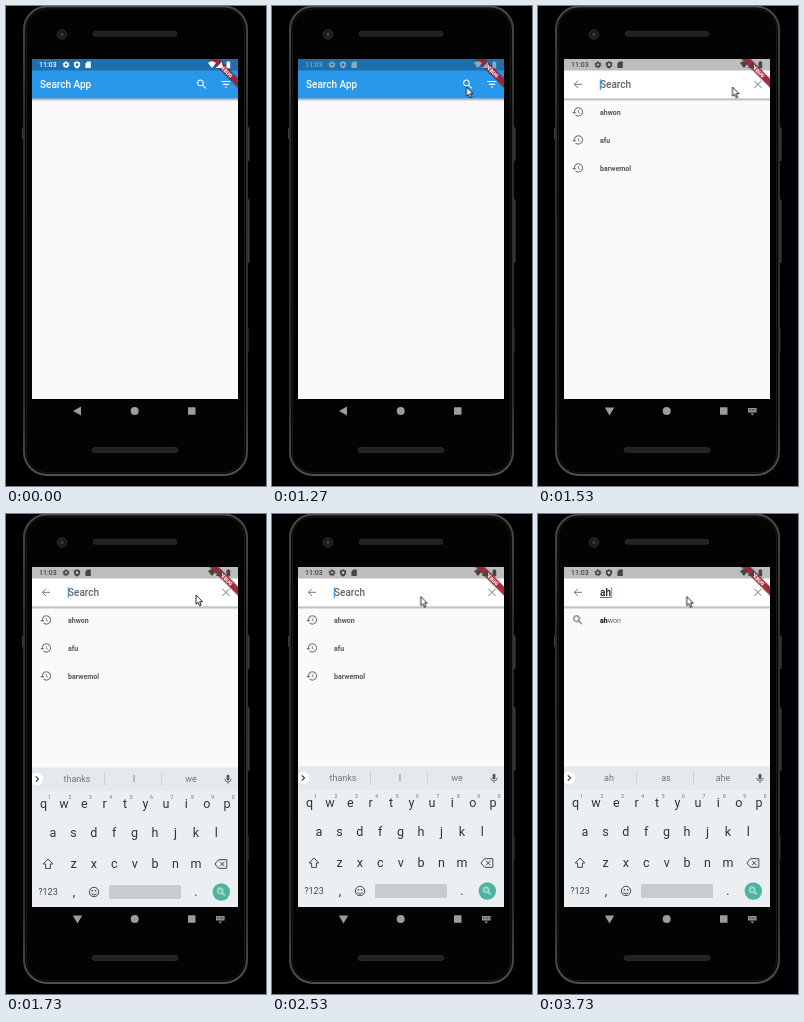
An HTML page that plays this animation: 260x480 px, repeating every 3940 ms.

```html
<!DOCTYPE html>
<html lang="en">
<head>
<meta charset="utf-8">
<title>Search App</title>
<style>
html, body { margin: 0; width: 100%; height: 100%; overflow: hidden; background: #000; }
svg { display: block; width: 260px; height: 480px; font-family: Roboto, sans-serif; }
.title { font-size: 10px; font-weight: 500; }
.row { font-size: 7px; font-weight: 700; fill: #575759; }
.match { font-weight: 400; }
.match tspan { font-weight: 700; fill: #111; }
.mid { text-anchor: middle; }
.suggest { font-size: 9px; fill: #74777b; text-anchor: middle; }
.key { font-size: 12.5px; fill: #303236; text-anchor: middle; }
.digit { font-size: 5px; fill: #6d7074; text-anchor: middle; }

.status, .page, .keys, .caret, .hint, .idle, .first, .second, .typing, .up, .down, .pointer {
  animation: 3940ms step-end infinite;
}
.pointer { animation-name: pointer; }
.status { animation-name: status; }
.page { animation-name: page; }
.keys { animation-name: keys; }
.caret { animation-name: caret; }
.hint { animation-name: hint; }
.idle { animation-name: idle; }
.first { animation-name: first; }
.second { animation-name: second; }
.typing { animation-name: typing; }
.up { animation-name: up; }
.down { animation-name: down; }

@keyframes pointer {
  0% { transform: translate(270px, 160px); }
  1.77% { transform: translate(239px, 132px); }
  3.29% { transform: translate(232px, 121px); }
  5.07% { transform: translate(222px, 108px); }
  6.85% { transform: translate(211px, 97px); }
  8.37% { transform: translate(201px, 88px); }
  10.15% { transform: translate(195px, 84px); }
  13.45% { transform: translate(191px, 83px); }
  15.22% { transform: translate(192px, 81px); }
  17% { transform: translate(191px, 79px); }
  18.52% { transform: translate(193px, 80px); }
  20.3% { transform: translate(194px, 81px); }
  22.08% { transform: translate(194.5px, 81px); }
  42.38% { transform: translate(194px, 81px); }
  43.9% { transform: translate(190px, 81px); }
  45.68% { transform: translate(178px, 82px); }
  47.46% { transform: translate(164px, 82px); }
  48.98% { transform: translate(153px, 82px); }
  50.76%, 100% { transform: translate(148.7px, 82.5px); }
}
@keyframes status {
  0% { color: #fff; }
  32.23% { color: #8fa9bd; }
  33.75% { color: #5a666f; }
  35.53%, 100% { color: #454547; }
}
@keyframes page {
  0% { opacity: 0; }
  33.75% { opacity: .3; }
  35.53% { opacity: .55; }
  37.3% { opacity: .8; }
  38.83%, 100% { opacity: 1; }
}
@keyframes keys {
  0% { transform: translateY(150px); }
  42.38% { transform: translateY(14px); }
  43.9% { transform: translateY(1px); }
  45.68%, 100% { transform: none; }
}
@keyframes caret {
  0% { opacity: 1; }
  50.76% { opacity: 0; }
  62.69% { opacity: 1; }
  76.14% { opacity: 0; }
  84.51% { opacity: 1; transform: translateX(5.6px); }
  94.67%, 100% { opacity: 1; transform: translateX(11.2px); }
}
@keyframes hint {
  0% { opacity: 1; }
  84.51% { opacity: .7; }
  88.07% { opacity: .25; }
  89.59%, 100% { opacity: 0; }
}
@keyframes idle { 0% { opacity: 1; } 84.51%, 100% { opacity: 0; } }
@keyframes first { 0% { opacity: 0; } 84.51% { opacity: 1; } 94.67%, 100% { opacity: 0; } }
@keyframes second { 0% { opacity: 0; } 94.67%, 100% { opacity: 1; } }
@keyframes typing { 0% { opacity: 0; } 84.51%, 100% { opacity: 1; } }
@keyframes up { 0% { opacity: 1; } 38.83%, 100% { opacity: 0; } }
@keyframes down { 0% { opacity: 0; } 38.83%, 100% { opacity: 1; } }
</style>
</head>
<body>
<svg viewBox="0 0 260 480">
  <defs>
    <linearGradient id="rim" x1="0" y1="0" x2="0" y2="1">
      <stop offset="0" stop-color="#4a4a4b"/>
      <stop offset=".25" stop-color="#2d2d2e"/>
      <stop offset=".85" stop-color="#303031"/>
      <stop offset="1" stop-color="#505051"/>
    </linearGradient>
    <linearGradient id="shade" x1="0" y1="0" x2="0" y2="1">
      <stop offset="0" stop-opacity=".32"/>
      <stop offset="1" stop-opacity="0"/>
    </linearGradient>
    <clipPath id="screen"><path d="M26 53h206v340H26z"/></clipPath>
    <symbol id="search" viewBox="0 0 24 24"><path d="M15.5 14h-.79l-.28-.27C15.41 12.59 16 11.11 16 9.5 16 5.91 13.09 3 9.5 3S3 5.91 3 9.5 5.91 16 9.5 16c1.61 0 3.09-.59 4.23-1.57l.27.28v.79l5 4.99L20.49 19l-4.99-5zm-6 0C7.01 14 5 11.99 5 9.5S7.01 5 9.5 5 14 7.01 14 9.5 11.99 14 9.5 14z"/></symbol>
    <symbol id="history" viewBox="0 0 24 24"><path d="M13 3a9 9 0 0 0-9 9H1l3.9 3.9.1.1 4-4H6a7 7 0 1 1 2.06 4.94l-1.42 1.42A9 9 0 1 0 13 3zm-1 5v5l4.28 2.54.72-1.21-3.5-2.08V8z"/></symbol>
  </defs>

  <!-- phone -->
  <g fill="#3c3c3d">
    <rect x="239" y="121" width="4.5" height="34" rx="1.5"/>
    <rect x="239" y="193" width="4.5" height="64" rx="1.5"/>
    <path d="M16 122h2v11h-2zM241 322h1.5v24H241z"/>
  </g>
  <rect x="18" y=".5" width="223" height="468.5" rx="23" fill="#050505" stroke="url(#rim)" stroke-width="2"/>
  <rect x="20.5" y="3" width="218" height="463.5" rx="20.5" fill="#030303" stroke="#171718"/>
  <circle cx="56" cy="28.5" r="4.7" fill="#18191b" stroke="#303134"/>
  <circle cx="56" cy="28.5" r="2" fill="#2c3654"/>
  <g fill="#222223" stroke="#313132" stroke-width=".7">
    <rect x="87" y="25.3" width="84" height="5" rx="2.5"/>
    <rect x="86" y="441.5" width="86" height="5" rx="2.5"/>
  </g>

  <!-- navigation bar -->
  <g fill="#9c9c9d">
    <path class="up" d="M67 405l8-4.5v9z"/>
    <path class="down" d="M71.5 409.5l-4.7-8h9.4z"/>
    <circle cx="128.7" cy="405" r="4"/>
    <rect x="182" y="401.3" width="7.5" height="7.5" rx=".6"/>
    <g class="down">
      <rect x="210" y="402" width="8.6" height="4.6" rx=".6"/>
      <path d="M212.5 407.6h3.6l-1.8 1.8z"/>
      <path d="M211 403.3h6.6M211 404.7h6.6" stroke="#111" stroke-width=".6" stroke-dasharray=".9 .5"/>
    </g>
  </g>

  <g clip-path="url(#screen)">
    <!-- home page -->
    <path d="M26 53h206v340H26z" fill="#faf9fc"/>
    <path d="M26 53h206v12H26z" fill="#1d70ad"/>
    <path d="M26 64.5h206v28H26z" fill="#2998ea"/>
    <path d="M26 92.5h206v3H26z" fill="url(#shade)"/>
    <g fill="#fff">
      <text class="title" x="34" y="82">Search App</text>
      <use href="#search" x="189.5" y="72" width="12.5" height="12.5"/>
      <path d="M215.3 75h9.2v1.1h-9.2zM216.9 77.8h6v1.1h-6zM218.9 80.5h2v1.1h-2z"/>
    </g>

    <!-- search page -->
    <g class="page">
      <path d="M26 53h206v340H26z" fill="#faf9fc"/>
      <path d="M26 53h206v12H26z" fill="#bdbdbe"/>
      <path d="M26 64.5h206v28H26z" fill="#fff"/>
      <path d="M26 92.5h206v3H26z" fill="url(#shade)"/>
      <path d="M44 78.3h-7.6m3.6-3.7l-3.7 3.7 3.7 3.7M216.3 74.8l7.2 7.2m0-7.2l-7.2 7.2" fill="none" stroke="#77787a"/>
      <text class="title hint" x="62" y="82" fill="#636466">Search</text>
      <g class="title" fill="#161616">
        <text class="first" x="62" y="82">a</text>
        <text class="second" x="62" y="82">ah</text>
      </g>
      <path class="first" d="M62 83.2h5.4v.7H62z" fill="#333"/>
      <path class="second" d="M62 83.2h11v.7H62z" fill="#333"/>
      <path class="caret" d="M61.8 73.3h1v10.6h-1z" fill="#2489d8"/>
      <g class="row">
        <g class="idle">
          <g fill="#77787a">
            <use href="#history" x="33.7" y="99.8" width="12.4" height="12.4"/>
            <use href="#history" x="33.7" y="127.8" width="12.4" height="12.4"/>
            <use href="#history" x="33.7" y="155.8" width="12.4" height="12.4"/>
          </g>
          <text x="62" y="108.5">ahwon</text>
          <text x="62" y="136.5">afu</text>
          <text x="62" y="164.5">barwemol</text>
        </g>
        <use class="typing" href="#search" x="33.7" y="99.8" width="12.4" height="12.4"/>
        <g class="match first">
          <use href="#search" x="33.7" y="127.8" width="12.4" height="12.4"/>
          <text x="62" y="108.5"><tspan>a</tspan>hwon</text>
          <text x="62" y="136.5"><tspan>a</tspan>fu</text>
        </g>
        <text class="match second" x="62" y="108.5"><tspan>ah</tspan>won</text>
      </g>

      <!-- keyboard -->
      <g class="keys">
        <path d="M26 252.5h206v150H26z" fill="#eceff2"/>
        <path d="M26 252.5h206v23.5H26z" fill="#e6e9ec"/>
        <path d="M98.5 257.5v13M155.5 257.5v13" stroke="#c9ccd0" stroke-width=".8"/>
        <circle cx="31" cy="264" r="6.2" fill="#fff"/>
        <path d="M29.8 261.3l2.7 2.7-2.7 2.7" fill="none" stroke="#333" stroke-width="1.1"/>
        <g fill="none" stroke="#55585c">
          <path d="M222 261.2v3" stroke-width="2.8" stroke-linecap="round"/>
          <path d="M218.8 263.8a3.2 3.2 0 0 0 6.4 0M222 267v2" stroke-width=".8"/>
        </g>
        <g class="suggest">
          <g class="idle"><text x="71" y="267">thanks</text><text x="128" y="267">I</text><text x="185" y="267">we</text></g>
          <g class="first"><text x="71" y="267">a</text><text x="128" y="267">as</text><text x="185" y="267">and</text></g>
          <g class="second"><text x="71" y="267">ah</text><text x="128" y="267">as</text><text x="185" y="267">ahe</text></g>
        </g>
        <g id="letters"></g>
        <g fill="none" stroke="#45484c">
          <path d="M42 344l-4.8 5h2.4v4.4h4.8V349h2.4zM212.5 344.7h8.3v8.6h-8.3l-3.6-4.3zM214 346.8l4.4 4.4m0-4.4l-4.4 4.4"/>
          <circle cx="88" cy="377" r="4.7"/>
          <path d="M85.5 378.3a2.7 2.7 0 0 0 5 0"/>
        </g>
        <path d="M85.7 375h1.4v1.4h-1.4zM88.9 375h1.4v1.4h-1.4z" fill="#45484c"/>
        <text class="mid" x="42" y="380.3" font-size="9" fill="#45484c">?123</text>
        <text class="key" x="68" y="381">,</text>
        <text class="key" x="190" y="381">.</text>
        <rect x="103" y="370" width="72" height="14" rx="1.5" fill="#c8cbcf"/>
        <circle cx="215.3" cy="377" r="8.7" fill="#4bb5a0"/>
        <use href="#search" x="209.8" y="371.5" width="11" height="11" fill="#fff"/>
      </g>
    </g>

    <!-- corner banner -->
    <g transform="translate(232 53) rotate(45)">
      <path d="M-22 13h44v8h-44z" opacity=".18"/>
      <path d="M-22 14h44v6h-44z" fill="#a51f30" opacity=".93"/>
      <text class="mid" y="18.8" font-size="5.1" font-weight="900" fill="#fff">DEBUG</text>
    </g>

    <!-- status icons -->
    <g class="status" fill="currentColor">
      <text x="33" y="61.3" font-size="7" font-weight="500">11:03</text>
      <g fill="none" stroke="currentColor">
        <circle cx="60" cy="58.7" r="1.9" stroke-width="1.5"/>
        <circle cx="60" cy="58.7" r="3" stroke-width="1" stroke-dasharray="1.6 1.54"/>
      </g>
      <path fill-rule="evenodd" d="M71 55.2l3.1 1.2v2.3c0 1.8-1.3 3.2-3.1 3.8-1.800-.6-3.100-2-3.100-3.800v-2.300zM71 57.300a1.400 1.400 0 1 0 0 2.800 1.400 1.400 0 1 0 0-2.800z"/>
      <path d="M81.300 55.500h3.500v6.600h-5.400v-4.700zM202 57q4-3.300 8 0l-4 5zM216 55.800v6.200h-6.200zM220.500 56h1v-.8h1.700v.8h1v6.200h-3.700z"/>
    </g>
  </g>

  <path class="pointer" d="M0 0v9.200l2.100-1.900 1.500 3.500 1.600-.7-1.500-3.400h2.800z" fill="#fff" stroke="#151515" stroke-width=".9"/>
</svg>
<script>
const letters = document.getElementById("letters");

function addText(text, x, y, cls) {
  const node = document.createElementNS("http://www.w3.org/2000/svg", "text");
  node.setAttribute("class", cls);
  node.setAttribute("x", x);
  node.setAttribute("y", y);
  node.textContent = text;
  letters.append(node);
}

const pitch = 20.4;
const rows = [["qwertyuiop", 37.5, 293], ["asdfghjkl", 47, 322.3], ["zxcvbnm", 67.5, 352.5]];
for (const [chars, left, base] of rows) {
  [...chars].forEach((char, i) => addText(char, left + i * pitch, base, "key"));
}
[..."1234567890"].forEach((digit, i) => addText(digit, 43.5 + i * pitch, 283.5, "digit"));
</script>
</body>
</html>
```
